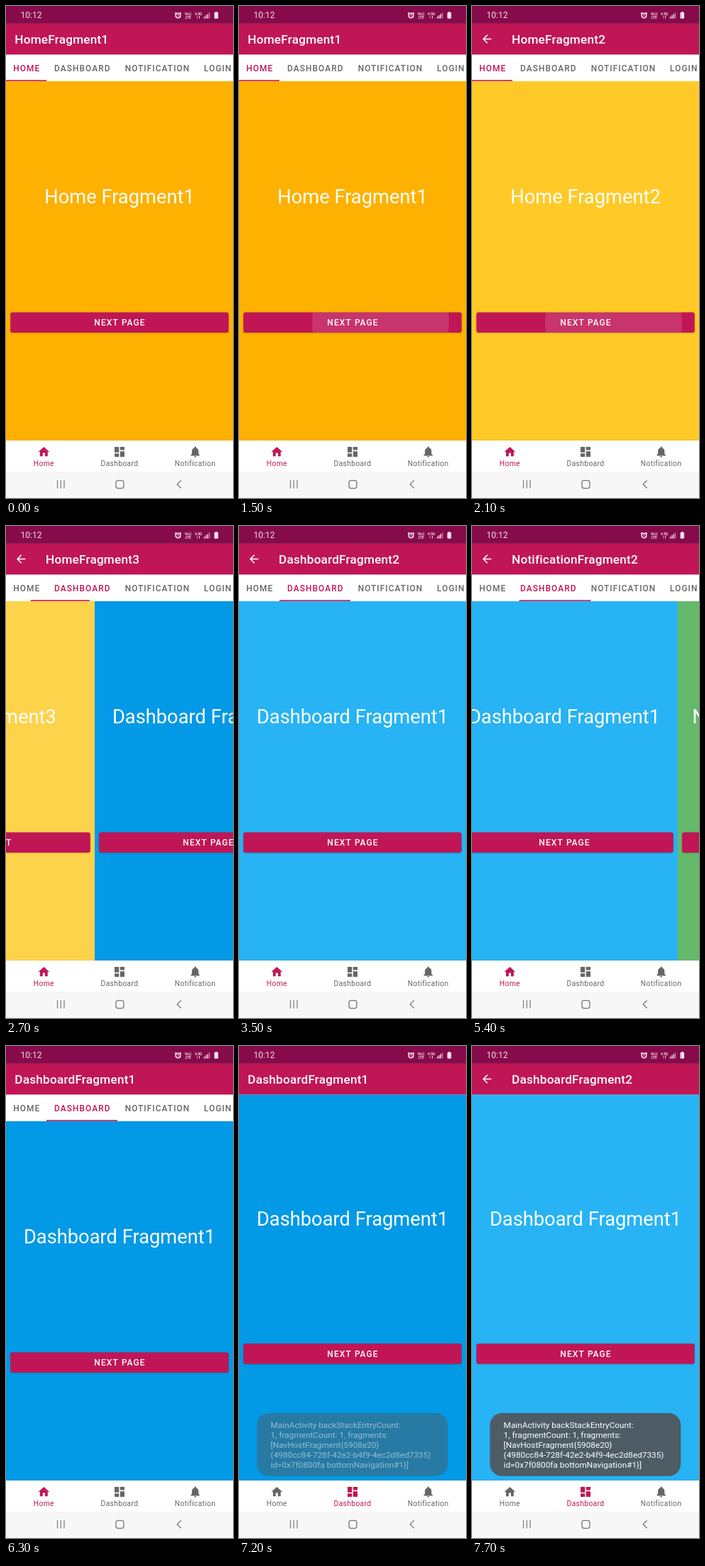
Write an HTML page with a canvas that moves like this. It is 320x693 px and loops after 8000 ms.

```html
<!DOCTYPE html>
<html lang="en">
<head>
<meta charset="utf-8">
<title>Tabs and navigation</title>
<style>
html, body { margin: 0; width: 100%; height: 100%; overflow: hidden; background: #fff; }
canvas { display: block; width: 320px; height: 693px; }
</style>
</head>
<body>
<canvas id="stage"></canvas>
<script>
const W = 320, H = 693, LOOP = 8000, STEP = 100;
const BAR = 24.9, TABS_TOP = 68.4, PAGE_TOP = 105.8, NAV_TOP = 612.1, SYS_TOP = 655.7;
const PINK = '#c01656', GREY = '#666', FONT = 'Roboto, sans-serif';
const canvas = document.getElementById('stage');
const ctx = canvas.getContext('2d');
const dpr = window.devicePixelRatio || 1;
canvas.width = W * dpr;
canvas.height = H * dpr;

const ICONS = {
  home: 'M10 20v-6h4v6h5v-8h3L12 3 2 12h3v8z',
  dash: 'M3 13h8V3H3zM3 21h8v-6H3zM13 21h8V11h-8zM13 3v6h8V3z',
  bell: 'M12 22c1.1 0 2-.9 2-2h-4c0 1.1.9 2 2 2zm6-6v-5c0-3.1-1.6-5.6-4.5-6.3V4a1.5 1.5 0 0 0-3 0v.7C7.6 5.4 6 7.9 6 11v5l-2 2v1h16v-1z',
  back: 'M20 11H7.8l5.6-5.6L12 4l-8 8 8 8 1.4-1.4L7.8 13H20z'
};

const TABS = [['HOME', 0, 57], ['DASHBOARD', 57, 157], ['NOTIFICATION', 157, 268.5], ['LOGIN', 268.5, 327.5]];
const NAV = [['Home', 'home', 53.3], ['Dashboard', 'dash', 160], ['Notification', 'bell', 266.7]];

// time, pager position
const SWIPES = [[2600, 0], [2700, .61], [2800, .93], [2900, 1], [3900, 1], [4000, 1.55], [4100, 1.9],
  [4200, 2], [5100, 2], [5200, 1.75], [5300, 1.4], [5400, 1.094], [5500, 1.01], [5600, 1]];

// time, title, back arrow, start of the arrow's exit
const TITLES = [
  [0, 'HomeFragment1', 0], [1600, 'HomeFragment2', 1], [2200, 'HomeFragment3', 1],
  [2900, 'DashboardFragment1', 0, 2850], [3500, 'DashboardFragment2', 1],
  [4100, 'NotificationFragment1', 0, 4050], [4700, 'NotificationFragment2', 1],
  [5500, 'DashboardFragment2', 1], [6000, 'DashboardFragment1', 0, 5850], [7700, 'DashboardFragment2', 1]];

// time, centre and radius of a button press
const PRESSES = [[1500, 199.5, 96.5], [2100, 199.5, 96.5], [3400, 190, 96], [4600, 190, 96], [7600, 190, 96]];

const TOAST = ['MainActivity backStackEntryCount:', '1, fragmentCount: 1, fragments:', '[NavHostFragment{5908e20}',
  '(4980cc84-728f-42e2-b4f9-4ec2d8ed7335)', 'id=0x7f0800fa bottomNavigation#1}]'];

const clamp = (v, a = 0, b = 1) => Math.min(b, Math.max(a, v));
const lerp = (a, b, k) => a + (b - a) * k;
const ease = k => (1 - Math.cos(Math.PI * clamp(k))) / 2;

function rect(x, y, w, h, color) {
  ctx.fillStyle = color;
  ctx.fillRect(x, y, w, h);
}

function round(x, y, w, h, r) {
  ctx.beginPath();
  ctx.roundRect(x, y, w, h, r);
}

function disc(x, y, r, color) {
  ctx.fillStyle = color;
  ctx.beginPath();
  ctx.arc(x, y, r, 0, 7);
  ctx.fill();
}

function line(color, width, ...points) {
  ctx.strokeStyle = color;
  ctx.lineWidth = width;
  ctx.beginPath();
  points.forEach(([x, y]) => ctx.lineTo(x, y));
  ctx.stroke();
}

function setFont(size, weight, spacing) {
  ctx.font = `${weight} ${size}px ${FONT}`;
  ctx.letterSpacing = spacing + 'px';
}

function text(str, x, y, size, color, { weight = 400, spacing = 0, align = 'left' } = {}) {
  setFont(size, weight, spacing);
  ctx.textAlign = align;
  ctx.fillStyle = color;
  ctx.fillText(str, x, y);
}

function icon(name, x, y, color) {
  ctx.save();
  ctx.translate(x, y);
  ctx.scale(.778, .778);
  ctx.fillStyle = color;
  ctx.fill(new Path2D(ICONS[name]));
  ctx.restore();
}

function clipped(x, y, w, h, draw) {
  ctx.save();
  ctx.beginPath();
  ctx.rect(x, y, w, h);
  ctx.clip();
  draw();
  ctx.restore();
}

function pagerPos(t) {
  const i = SWIPES.findIndex(s => s[0] > t);
  if (i === 0) return 0;
  if (i < 0) return 1;
  const [t0, a] = SWIPES[i - 1], [t1, b] = SWIPES[i];
  return lerp(a, b, (t - t0) / (t1 - t0));
}

function pageInfo(i, t) {
  if (i === 0) {
    const n = t < 1600 ? 1 : t < 2200 ? 2 : 3;
    return [['#feb100', '#ffca28', '#fdd34b'][n - 1], 'Home Fragment' + n, n < 3 ? 'NEXT PAGE' : 'GO TO START'];
  }
  if (i === 1) {
    const second = t >= 3500 && t < 6000 || t >= 7700;
    return [second ? '#27b3f4' : '#0299e6', 'Dashboard Fragment1', 'NEXT PAGE'];
  }
  return [t < 4700 ? '#419f46' : '#65b96a', 'Notification Fragment1', 'NEXT PAGE'];
}

function button(x, y, label, t) {
  const shape = () => round(x + 6.2, y - 14.3, 307.6, 28.6, 3);
  ctx.save();
  ctx.shadowColor = 'rgba(0,0,0,.25)';
  ctx.shadowBlur = 2 * dpr;
  ctx.shadowOffsetY = .6 * dpr;
  ctx.fillStyle = PINK;
  shape();
  ctx.fill();
  ctx.restore();
  const press = PRESSES.find(p => t >= p[0] && t < p[0] + STEP);
  if (press) {
    ctx.save();
    shape();
    ctx.clip();
    disc(x + press[1], y, press[2], 'rgba(255,255,255,.13)');
    ctx.restore();
  }
  text(label, x + 160.5, y + 4.5, 12, '#fff', { weight: 500, spacing: 1.07, align: 'center' });
}

function page(i, x, top, t) {
  const [color, name, label] = pageInfo(i, t);
  const h = NAV_TOP - top;
  rect(x, top, W, h, color);
  clipped(x, top, W, h, () => {
    text(name, x + 160, top + h * .323 + 9, 27.3, '#fff', { align: 'center' });
    button(x, top + h * .6715, label, t);
  });
}

function tabs(pos) {
  const i = Math.min(2, Math.floor(pos)), k = pos - i;
  const left = lerp(TABS[i][1], TABS[i + 1][1], k);
  const right = lerp(TABS[i][2], TABS[i + 1][2], k);
  const mid = j => (TABS[j][1] + TABS[j][2]) / 2;
  const scroll = clamp(lerp(mid(i), mid(i + 1), k) - 160, 0, 7.5);
  rect(0, TABS_TOP, W, PAGE_TOP - TABS_TOP, '#fff');
  TABS.forEach(([label], j) => {
    const color = j === Math.round(pos) ? PINK : GREY;
    text(label, mid(j) + .8 - scroll, 91.5, 11.9, color, { weight: 500, spacing: 1.06, align: 'center' });
  });
  rect(left - scroll, PAGE_TOP - 1.6, right - left, 1.6, PINK);
}

function titleWidth(str) {
  setFont(17.2, 500, .2);
  return ctx.measureText(str).width;
}

function toolbar(t) {
  let i = TITLES.length - 1;
  while (TITLES[i][0] > t) i--;
  const [, title, arrow, start] = TITLES[i];
  let x = arrow ? 56 : 12.3, alpha = arrow, width = W;
  if (start) {
    const k = ease((t - start - 150) / 300);
    alpha = 1 - clamp((t - start) / 150);
    x = lerp(56, 12.3, k);
    if (k < 1) width = lerp(titleWidth(TITLES[i - 1][1]), titleWidth(title), k) + 3.5;
  }
  rect(0, BAR, W, TABS_TOP - BAR, PINK);
  clipped(x, BAR, width, TABS_TOP - BAR, () => text(title, x, 53, 17.2, '#fff', { weight: 500, spacing: .2 }));
  if (alpha) {
    ctx.globalAlpha = alpha;
    icon('back', 11.8, 37.2, '#fff');
    ctx.globalAlpha = 1;
  }
}

function statusBar() {
  const c = '#f3dde8', tiny = { weight: 700, align: 'center' };
  rect(0, 0, W, BAR, '#860b4a');
  text('10:12', 20.5, 17.3, 12, c);
  ctx.strokeStyle = c;
  ctx.lineWidth = 1.6;
  ctx.beginPath();
  ctx.arc(242.5, 13.5, 3.3, 0, 7);
  ctx.stroke();
  line(c, 1, [242.5, 11.5], [242.5, 13.8], [244, 14.6]);
  line(c, 1.5, [238, 11], [240.3, 9]);
  line(c, 1.5, [247, 11], [244.7, 9]);
  text('Vo))', 256.7, 12.5, 5, c, tiny);
  text('LTE', 256.7, 17.8, 5, c, tiny);
  text('4.5G', 271.2, 12.5, 5, c, tiny);
  line('#d08aae', 1, [269.5, 14], [269.5, 17.5]);
  line(c, 1, [272.5, 14], [272.5, 17.5]);
  for (let i = 0; i < 4; i++) rect(279 + i * 2.3, 15 - i * 1.9, 1.4, 2.6 + i * 1.9, i < 3 ? c : '#c58aa9');
  ctx.fillStyle = c;
  round(293.6, 9, 5.6, 8.8, 1);
  ctx.fill();
  rect(295.2, 8, 2.4, 1.2, c);
}

function bottomNav(t) {
  const active = t < 6900 ? 0 : 1, h = SYS_TOP - NAV_TOP;
  rect(0, NAV_TOP - 1, W, 1, 'rgba(0,0,0,.06)');
  rect(0, NAV_TOP, W, h, '#fff');
  const age = t - 6900;
  if (age >= 0 && age < 300) {
    clipped(0, NAV_TOP, W, h, () => disc(160, 634, 30 + age * .1, `rgba(192,22,86,${.14 - age * .0004})`));
  }
  NAV.forEach(([label, name, x], i) => {
    const color = i === active ? PINK : GREY;
    icon(name, x - 9.3, 618.6, color);
    text(label, x, 648, 10.3, color, { spacing: .34, align: 'center' });
  });
}

function systemNav() {
  const c = '#777';
  rect(0, SYS_TOP, W, H - SYS_TOP, '#f7f7f7');
  for (const x of [72.5, 77.2, 82]) line(c, 1.2, [x, 668], [x, 679.5]);
  ctx.lineWidth = 1.3;
  round(155, 668.3, 11, 11, 3);
  ctx.stroke();
  line(c, 1.3, [246.8, 668.3], [241.2, 673.8], [246.8, 679.3]);
}

function toast(t) {
  ctx.globalAlpha = clamp((t - 7000) / 400);
  ctx.fillStyle = '#4d5c65';
  round(25.3, 517, 269, 88.7, 17);
  ctx.fill();
  TOAST.forEach((s, i) => text(s, 44.6, 538.3 + i * 14, 11.8, '#fff'));
  ctx.globalAlpha = 1;
}

function draw(t) {
  ctx.setTransform(dpr, 0, 0, dpr, 0, 0);
  rect(0, 0, W, H, '#fff');
  if (t < 7000) {
    const pos = pagerPos(t);
    for (let i = 0; i < 3; i++) {
      if (Math.abs(i - pos) < 1) page(i, Math.round((i - pos) * W), PAGE_TOP, t);
    }
    tabs(pos);
  } else {
    page(1, 0, TABS_TOP, t);
  }
  toolbar(t);
  statusBar();
  if (t > 7000) toast(t);
  bottomNav(t);
  systemNav();
}

const begin = performance.now();
function tick() {
  const t = (performance.now() - begin) % LOOP;
  draw(Math.floor(t / STEP) * STEP);
  requestAnimationFrame(tick);
}
tick();
</script>
</body>
</html>
```
